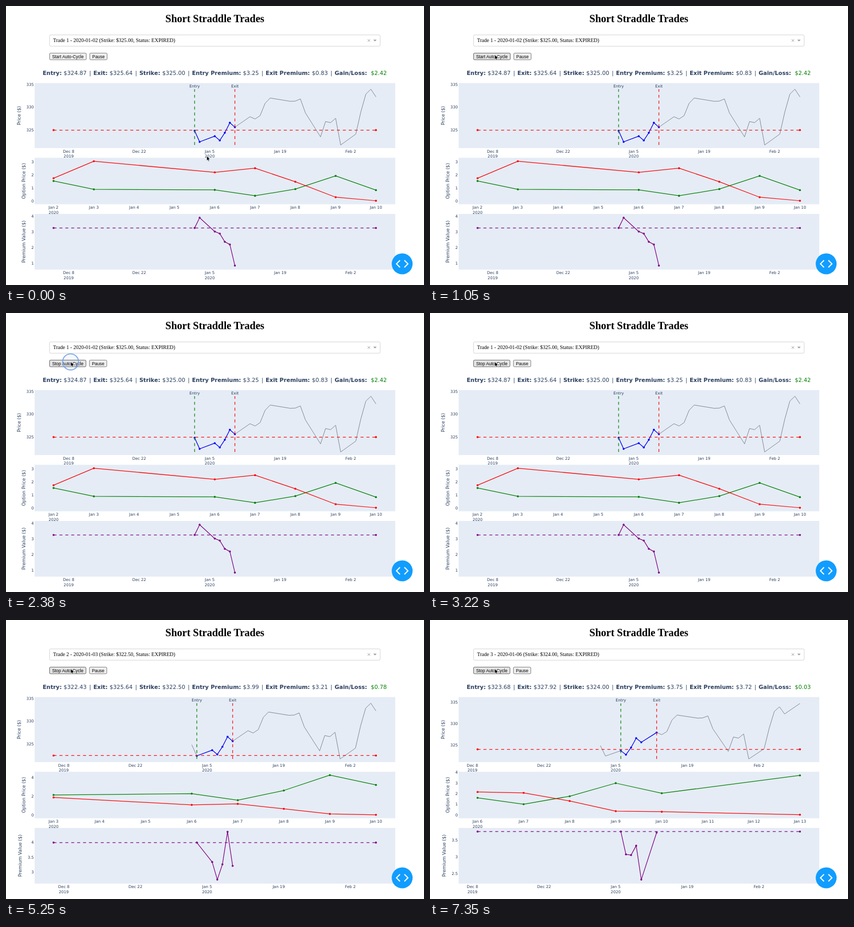
Recreate the animation shown at these times as an HTML page. Size 800x534 px, loop 8000 ms.

```html
<!DOCTYPE html>
<html lang="en">
<head>
<meta charset="utf-8">
<title>Short Straddle Trades</title>
<style>
  html, body { margin: 0; width: 100%; height: 100%; overflow: hidden; background: #fff; }
  svg { display: block; width: 100vw; height: 100vh; }
  .serif { font-family: "Liberation Serif", "Times New Roman", serif; fill: #000; }
  .ui { font: 8.37px "Liberation Sans", Arial, sans-serif; fill: #000; }
  .plot { font-family: "DejaVu Sans", Verdana, sans-serif; font-size: 7.53px; fill: #2a3f5f; }
  .summary { font-size: 10.67px; }
  .axis { font-size: 8.785px; }
  .line { fill: none; stroke-width: 1.25; stroke-linejoin: round; }
  .dash { stroke-dasharray: 5.65 5.65; }
</style>
</head>
<body>
<svg viewBox="0 0 800 534">
  <rect width="800" height="534" fill="#fff"/>
  <text class="serif" x="399.7" y="31" font-size="20" font-weight="bold" text-anchor="middle">Short Straddle Trades</text>

  <rect x="83.4" y="55.3" width="632.7" height="21.7" rx="2.4" fill="#fff" stroke="#c8c8c8" stroke-width=".8"/>
  <text id="choice" class="serif" x="90" y="69.3" font-size="10.04"></text>
  <path d="M692.2 63.7l4.6 4.6m0 -4.6l-4.6 4.6" stroke="#999" stroke-width="1"/>
  <path d="M703 64.6h6.4l-3.2 3.2z" fill="#999"/>

  <rect id="cycleBox" x="83.4" y="90.2" height="12.7" rx="1.8" stroke-width=".9"/>
  <text id="cycle" class="ui" x="88.2" y="99.5"></text>
  <g id="pause">
    <rect x="160.3" y="90.2" width="33.2" height="12.7" rx="1.8" fill="#efefef" stroke="#6e6e6e" stroke-width=".9"/>
    <text class="ui" x="165.1" y="99.5">Pause</text>
  </g>

  <g id="charts" class="plot"></g>

  <circle cx="758.2" cy="493.5" r="20" fill="#119dff"/>
  <path d="M754 486.8l-6.7 6.7l6.7 6.7M762.5 486.8l6.7 6.7l-6.7 6.7" fill="none" stroke="#fff" stroke-width="2.1"/>

  <circle id="ring" cx="123.6" cy="93.6" fill="#6f9fe8" fill-opacity=".08" stroke="#6f9fe8" stroke-width="2"/>
  <path id="cursor" d="M0 0V9.2L2.1 7.3L3.5 10.5L5 9.8L3.7 6.8L6.5 6.6Z" fill="#000" stroke="#fff" stroke-width=".7"/>
</svg>
<script>
const $ = id => document.getElementById(id);
const LOOP = 8000, LEFT = 91, RIGHT = 708;

// Days count from 2 January 2020; weekends and one holiday are closed.
const closes = [324.87, 322.43, 323.68, 322.74, 324.42, 326.6, 325.64, 327.92, 327.42, 328.15,
  330.85, 332, 331.28, 331.33, 331.8, 328.75, 323.52, 326.87, 326.62, 327.58, 321.75,
  324.12, 328.95, 332.85, 333.92, 332.25, 334.7];
const openDays = [];
for (let d = 0; openDays.length < closes.length; d++) {
  if ((d + 4) % 7 % 6 && d !== 18) openDays.push(d);
}
const prices = openDays.map((d, i) => [d, closes[i]]);

// Each axis: a reference value, its y, pixels per unit, tick labels.
const trades = [
  { name: "Trade 1 - 2020-01-02", strike: 325, entry: 0, exit: 8, end: 36,
    info: ["$324.87", "$325.64", "$325.00", "$3.25", "$0.83", "$2.42"],
    green: [1.52, .88, .84, .39, .9, 1.91, .82],
    red: [1.73, 3.03, 2.18, 2.5, 1.46, .28, .01],
    axes: [[325, 237.5, 8.77, [325, 330, 335]], [0, 373, 25.05, [0, 1, 2, 3]], [3, 432.3, 29.75, [1, 2, 3, 4]]] },
  { name: "Trade 2 - 2020-01-03", strike: 322.5, entry: 1, exit: 8, end: 36,
    info: ["$322.43", "$325.64", "$322.50", "$3.99", "$3.21", "$0.78"],
    green: [2.13, 2.27, 1.57, 2.61, 4.25, 3.2],
    red: [1.86, 1.07, 1.18, .65, .1, .01],
    axes: [[325, 237.5, 8.77, [325, 330, 335]], [0, 373, 17.9, [0, 2, 4]], [3.5, 454, 57.1, [3, 3.5, 4]]] },
  { name: "Trade 3 - 2020-01-06", strike: 324, entry: 4, exit: 11, end: 39,
    info: ["$323.68", "$327.92", "$324.00", "$3.75", "$3.72", "$0.03"],
    green: [1.6, 1, 1.75, 2.98, 2.03, 3.71],
    red: [2.15, 2.07, 1.3, .35, .29, .01],
    axes: [[325, 239.3, 8.2, [325, 330, 335]], [0, 372.9, 20.35, [0, 1, 2, 3, 4]], [3, 453.1, 64.3, [2.5, 3, 3.5]]] }
];
const panels = [
  { top: 147.5, bottom: 272, title: "Price ($)", mid: 209.8 },
  { top: 290.5, bottom: 379.5, title: "Option Price ($)", mid: 335 },
  { top: 398, bottom: 504.5, title: "Premium Value ($)", mid: 451 }
];
const labels = ["Entry:", "Exit:", "Strike:", "Entry Premium:", "Exit Premium:", "Gain/Loss:"];
const labelX = [70.3, 167.3, 255.2, 355.9, 497, 629];
const valueX = [110.3, 198.3, 298.9, 453.6, 585.6, 698.2];

const text = (x, y, s, anchor = "middle", attrs = "") =>
  `<text x="${x}" y="${y}" text-anchor="${anchor}" ${attrs}>${s}</text>`;
const line = (pts, color, attrs = 'class="line"') =>
  `<polyline points="${pts.map(p => p.join()).join(" ")}" fill="none" stroke="${color}" ${attrs}/>`;
const dots = (pts, color) =>
  pts.map(([x, y]) => `<circle cx="${x}" cy="${y}" r="1.9" fill="${color}"/>`).join("");
const dashed = (pts, color) => line(pts, color, 'class="line dash"');
const marked = (pts, color) => line(pts, color) + dots(pts, color);
const level = (y, color) => {
  const pts = [[LEFT, y], [RIGHT, y]];
  return dashed(pts, color) + dots(pts, color);
};

function dateTicks(days, x, y) {
  let year = 0;
  return days.map(d => {
    const date = new Date(Date.UTC(2020, 0, 2 + d));
    const month = date.getUTCMonth(), full = date.getUTCFullYear();
    const name = month === 11 ? "Dec" : month ? "Feb" : "Jan";
    const top = text(x(d), y, `${name} ${date.getUTCDate()}`);
    const extra = full === year ? "" : text(x(d), y + 9.8, full);
    year = full;
    return top + extra;
  }).join("");
}

function summary(info) {
  return labels.map((label, i) =>
    text(labelX[i], 132, label, "start", 'class="summary" font-weight="bold"') +
    text(valueX[i], 132, info[i], "start", `class="summary"${i === 5 ? ' fill="green"' : ""}`) +
    (i ? text(labelX[i] - 6.2, 132, "|", "middle", 'class="summary"') : "")
  ).join("");
}

function chart(t) {
  const scale = (a, b) => d => LEFT + (d - a) * (RIGHT - LEFT) / (b - a);
  const longX = scale(t.entry - 28, t.end), shortX = scale(t.entry, t.exit);
  const [priceY, optionY, premiumY] = t.axes.map(([v0, y0, unit]) => v => y0 - (v - v0) * unit);
  const plot = (pts, x, y) => pts.map(([d, v]) => [x(d), y(v)]);
  const shown = prices.filter(p => p[0] <= t.end);
  const held = shown.filter(p => p[0] >= t.entry && p[0] <= t.exit);
  const series = values => values.map((v, i) => [held[i][0], v]);
  const premium = t.green.map((v, i) => v + t.red[i]);
  const values = shown.map(p => p[1]);
  const low = priceY(Math.min(...values)), high = priceY(Math.max(...values));
  const weeks = [-25, -11, 3, 17, 31], days = [];
  for (let d = t.entry; d <= t.exit; d++) days.push(d);

  const frame = panels.map((p, i) => {
    const [v0, y0, unit, ticks] = t.axes[i];
    const wide = Math.max(...ticks.map(v => String(v).replace(".", "").length));
    const titleX = wide === 3 ? 27.6 : wide === 2 ? 29.8 : 37.3;
    return `<rect x="54.8" y="${p.top}" width="690.2" height="${p.bottom - p.top}" fill="#e5ecf6"/>` +
      ticks.map(v => text(53.4, y0 - (v - v0) * unit + 2.7, v, "end")).join("") +
      text(0, 0, p.title, "middle", `class="axis" transform="translate(${titleX} ${p.mid}) rotate(-90)"`) +
      dateTicks(i === 1 ? days : weeks, i === 1 ? shortX : longX, p.bottom + 8.5);
  }).join("");

  const mark = (d, color, name) =>
    dashed([[longX(d), low], [longX(d), high]], color) + text(longX(d), 156.2, name);

  return summary(t.info) + frame +
    line(plot(shown, longX, priceY), "#7b808a", 'stroke-width=".95"') +
    marked(plot(held, longX, priceY), "blue") +
    level(priceY(t.strike), "red") +
    mark(t.entry, "green", "Entry") + mark(t.exit, "red", "Exit") +
    marked(plot(series(t.green), shortX, optionY), "green") +
    marked(plot(series(t.red), shortX, optionY), "red") +
    marked(plot(series(premium), longX, premiumY), "purple") +
    level(premiumY(premium[0]), "purple");
}

$("charts").innerHTML = trades.map(t => `<g>${chart(t)}</g>`).join("");
const groups = [...$("charts").children];

const clamp = v => Math.max(0, Math.min(1, v));
const ease = v => v * v * (3 - 2 * v);
const stage = (t, first, second) => (t >= first) + (t >= second);

function draw(t) {
  const move = ease(clamp((t - 70) / 800));
  const x = 384.2 + (124 - 384.2) * move, y = 287 + (93.3 - 287) * move;
  $("cursor").setAttribute("transform", `translate(${x} ${y})`);

  const running = t >= 2240, hover = y < 103 && x < 154;
  $("cycle").textContent = running ? "Stop Auto-Cycle" : "Start Auto-Cycle";
  const box = $("cycleBox");
  box.setAttribute("width", running ? 69.6 : 70.2);
  box.setAttribute("fill", hover ? "#e5e5e5" : "#efefef");
  box.setAttribute("stroke", hover ? "#4f4f4f" : "#6e6e6e");
  $("pause").setAttribute("transform", `translate(${running ? -0.6 : 0} 0)`);

  const p = (t - 2100) / 560, live = p > 0 && p < 1;
  $("ring").setAttribute("r", live ? 15.3 * ease(clamp(p * 2.2)) : 0);
  $("ring").setAttribute("opacity", live ? 0.85 * clamp((1 - p) * 2.5) : 0);

  const pick = trades[stage(t, 4900, 7000)];
  $("choice").textContent = `${pick.name} (Strike: $${pick.strike.toFixed(2)}, Status: EXPIRED)`;
  const current = stage(t, 5040, 7140);
  groups.forEach((g, i) => g.setAttribute("display", i === current ? "inline" : "none"));
}

const start = performance.now();
function tick() {
  draw((performance.now() - start) % LOOP);
  requestAnimationFrame(tick);
}
tick();
</script>
</body>
</html>
```
